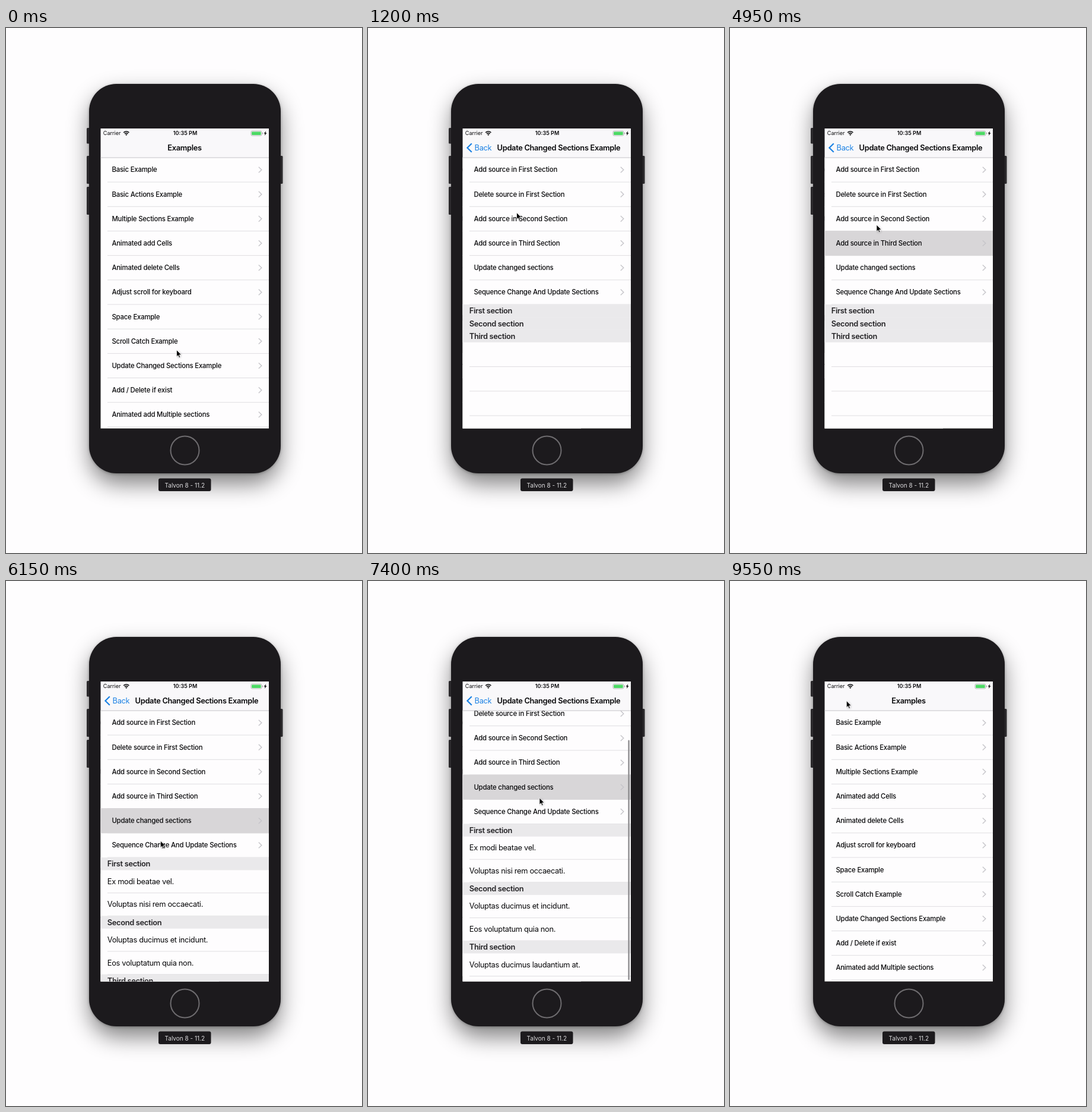
Recreate the animation shown at these times as an HTML page. Size 600 by 883 pixels, loop 9.75 s.

```html
<!DOCTYPE html>
<html lang="en">
<head>
<meta charset="utf-8">
<title>Section updates</title>
<style>
  html, body { margin: 0; width: 100%; height: 100%; overflow: hidden; background: #fefdfe; }
  svg { display: block; width: 600px; height: 883px; }
  text { font-family: Inter, Roboto, sans-serif; fill: #08080a; white-space: pre; }
  .row { font-size: 11.33px; font-weight: 500; letter-spacing: -.016em; }
  .title, .head { font-size: 12.84px; font-weight: 600; letter-spacing: -.025em; }
  .title { text-anchor: middle; }
  .head { fill: #242326; }
  .item, .back { font-size: 12.84px; letter-spacing: -.025em; }
  .back { fill: #1c82e4; }
  .status { font-size: 9.07px; }
  .line { fill: #dcdbde; }
  .chev { fill: none; stroke: #c6c5ca; stroke-width: 1.4; }
</style>
</head>
<body>
<svg viewBox="0 0 600 883" xmlns="http://www.w3.org/2000/svg">
  <defs>
    <clipPath id="screen"><rect x="159.5" y="169" width="283.5" height="504.5"/></clipPath>
    <filter id="blur" x="-40%" y="-30%" width="180%" height="160%"><feGaussianBlur stdDeviation="19"/></filter>
    <filter id="soft" x="-10%" y="-10%" width="120%" height="120%"><feGaussianBlur stdDeviation="2"/></filter>
  </defs>

  <rect x="142" y="112" width="319" height="654" rx="46" opacity=".5" filter="url(#blur)"/>
  <rect x="140" y="95" width="323" height="655" rx="46" opacity=".28" filter="url(#soft)"/>
  <g fill="#2b292c">
    <rect x="136" y="168" width="8" height="26.5" rx="1.5"/>
    <rect x="136" y="215" width="8" height="47" rx="1.5"/>
    <rect x="136" y="267" width="8" height="47" rx="1.5"/>
    <rect x="458" y="215" width="8.5" height="47" rx="1.5"/>
  </g>
  <rect x="140" y="94" width="323" height="655" rx="46" fill="#1c1a1d"/>
  <circle cx="301.5" cy="710.5" r="24" fill="none" stroke="#6e6c6f" stroke-width="2"/>
  <rect x="257" y="757.5" width="88.5" height="21.5" rx="3" fill="#1c1a1d"/>
  <text x="301.3" y="772.6" text-anchor="middle" style="font-size:10px;fill:#dddcde">Talvon 8 - 11.2</text>

  <g clip-path="url(#screen)">
    <g id="menu"></g>
    <g id="detail"></g>
    <rect x="159" y="169" width="285" height="49" fill="#f9f8fa"/>
    <rect x="159" y="217.6" width="285" height=".9" fill="#bfbec2"/>
    <text class="title" id="menuTitle" x="301" y="205.8">Examples</text>
    <text class="title" id="detailTitle" x="321.4" y="205.8">Update Changed Sections Example</text>
    <path id="backArrow" d="M174.8 194.2L167.4 201.5L174.8 208.8" fill="none" stroke="#1c82e4" stroke-width="2.2"/>
    <text class="back" id="backText" x="179.6" y="205.8">Back</text>
    <text class="status" x="163.8" y="180.4">Carrier</text>
    <text class="status" x="302" y="180.4" text-anchor="middle" font-weight="600">10:35 PM</text>
    <path d="M198.2 175.9a6.5 6.5 0 0 1 9.2 0M200 178a4 4 0 0 1 5.6 0" fill="none" stroke="#08080a" stroke-width="1.6"/>
    <path d="M201.2 179.3a2.2 2.2 0 0 1 3.2 0l-1.6 1.7z"/>
    <rect x="412.9" y="173.3" width="18" height="7.8" rx="2" fill="#fff" stroke="#a3a3a5" stroke-width=".8"/>
    <rect x="414.1" y="174.5" width="15.6" height="5.4" rx="1" fill="#4cd964"/>
    <rect x="431.8" y="175.8" width="1.1" height="2.8" rx=".5" fill="#a3a3a5"/>
    <path d="M438.3 173.2l-3.7 4.4h2.1l-.9 3.4 3.7-4.5h-2.2z"/>
  </g>

  <g id="cursor">
    <path d="M.6 1V12.2L3.2 9.8L4.9 13.8L6.6 13L5 9.2H8.6Z" opacity=".3" filter="url(#soft)"/>
    <path d="M0 0V11.4L2.6 9L4.3 13L6.2 12.2L4.5 8.3H8.1Z" stroke="#fff" stroke-width=".8"/>
  </g>
</svg>

<script>
const LOOP = 9750, STEP = 50;
const LEFT = 159, WIDTH = 285, TOP = 217.9, VIEW = 455.6;
const ROW = 41.18, ITEM = 38.55, HEAD = 21.16;
const MAX_SCROLL = 47.6, CONTENT = VIEW + MAX_SCROLL;
const DRAG_START = 6650, DRAG_END = 7150, DRAG_Y = 540;

const $ = id => document.getElementById(id);
const clamp = v => Math.min(1, Math.max(0, v));
const span = (t, start, length) => clamp((t - start) / length);
const easeOut = u => 1 - (1 - u) ** 3;
const smooth = u => u * u * (3 - 2 * u);
const show = (node, value) => node.setAttribute('opacity', value);
const move = (node, x, y) => node.setAttribute('transform', `translate(${x} ${y})`);

function add(parent, tag, attrs, text) {
  const node = document.createElementNS('http://www.w3.org/2000/svg', tag);
  for (const key in attrs) node.setAttribute(key, attrs[key]);
  if (text) node.textContent = text;
  return parent.appendChild(node);
}

const box = (parent, y, height, fill) =>
  add(parent, 'rect', { x: LEFT, y, width: WIDTH, height, fill });
const line = (parent, y) =>
  add(parent, 'rect', { class: 'line', x: 171, y: y - .45, width: 273, height: .9 });

// Adds a list of tappable rows and returns their highlight boxes.
function addRows(parent, labels) {
  return labels.map((label, i) => {
    const y = TOP + i * ROW, mid = y + ROW / 2;
    line(parent, y + ROW);
    const mark = box(parent, y - .5, ROW + 1, '#d8d6d8');
    add(parent, 'text', { class: 'row', x: 178.4, y: mid + 4 }, label);
    add(parent, 'path', { class: 'chev', d: `M425.8 ${mid - 4.8}L430.8 ${mid}L425.8 ${mid + 4.8}` });
    return mark;
  });
}

const menu = $('menu'), detail = $('detail');
box(menu, TOP, 460, '#fefdfe');
const menuMarks = addRows(menu, [
  'Basic Example', 'Basic Actions Example', 'Multiple Sections Example',
  'Animated add Cells', 'Animated delete Cells', 'Adjust scroll for keyboard',
  'Space Example', 'Scroll Catch Example', 'Update Changed Sections Example',
  'Add / Delete if exist', 'Animated add Multiple sections'
]);
const shade = box(menu, TOP, 460, '#000');

box(detail, TOP, 460, '#fefdfe');
const list = add(detail, 'g');
const detailMarks = addRows(list, [
  'Add source in First Section', 'Delete source in First Section',
  'Add source in Second Section', 'Add source in Third Section',
  'Update changed sections', 'Sequence Change And Update Sections'
]);
const sections = [
  ['First section', 'Ex modi beatae vel.', 'Voluptas nisi rem occaecati.'],
  ['Second section', 'Voluptas ducimus et incidunt.', 'Eos voluptatum quia non.'],
  ['Third section', 'Voluptas ducimus laudantium at.']
].map(([name, ...labels]) => {
  const group = add(list, 'g'), items = add(group, 'g');
  box(items, HEAD, labels.length * ITEM, '#fefdfe');
  labels.forEach((label, i) => {
    const y = HEAD + i * ITEM;
    add(items, 'text', { class: 'item', x: 170.8, y: y + ITEM / 2 + 4.3 }, label);
    line(items, y + ITEM);
  });
  box(group, 0, HEAD + .2, '#eae9eb');
  add(group, 'text', { class: 'head', x: 170.8, y: HEAD / 2 + 4.8 }, name);
  return { group, items, height: labels.length * ITEM };
});
const blanks = [1, 2, 3, 4].map(() => line(list, 0));
const thumb = add(detail, 'rect', { x: 438.4, width: 2.4, rx: 1.2, fill: '#8b8a8d' });

// Time, x, y of the pointer tip.
const path = [
  [0, 287.5, 541.5], [150, 277, 562], [600, 277, 562], [750, 276, 540],
  [950, 266, 430], [1100, 255, 345], [1200, 250.5, 310.5], [1300, 249, 268],
  [1450, 248, 240], [2050, 248, 239], [2200, 247, 237], [2400, 247, 237],
  [2600, 252, 262], [2750, 248, 305], [2900, 243, 320.5], [3650, 243, 320.5],
  [3750, 242, 318], [3850, 242, 318], [4100, 246, 357], [4500, 246, 357],
  [4850, 246, 335], [4950, 247, 331], [5050, 247, 331], [5350, 246, 410],
  [6000, 246, 410], [6250, 270, 455], [6350, 270, 455], [6550, 300, 540],
  [6650, 300, 540], [6950, 291, 372], [7350, 291, 372], [7500, 285, 350],
  [7900, 240, 250], [8200, 200, 206], [8350, 195, 202], [8400, 195, 202],
  [8500, 193, 201], [8550, 196.3, 201.5], [LOOP, 196.3, 201.5]
];

function pointer(t) {
  const i = path.findIndex(p => p[0] > t);
  const [t0, x0, y0] = path[i - 1], [t1, x1, y1] = path[i];
  const u = (t - t0) / (t1 - t0);
  return [x0 + (x1 - x0) * u, y0 + (y1 - y0) * u];
}

// Finger drag with rubber band, then a spring back to the end of the list.
function scrollAt(t) {
  if (t < DRAG_START) return 0;
  const drag = DRAG_Y - pointer(Math.min(t, DRAG_END))[1];
  if (drag <= MAX_SCROLL) return drag;
  const over = VIEW * (1 - 1 / ((drag - MAX_SCROLL) * .55 / VIEW + 1));
  const age = Math.max(0, t - DRAG_END) / 75;
  return MAX_SCROLL + over * (1 + age) * Math.exp(-age);
}

// Row index, highlighted from, until.
const taps = [[0, 1600, 3250], [2, 3150, 4300], [3, 4200, 5600], [4, 5500, LOOP]];

function drawDetail(t) {
  detailMarks.forEach((mark, i) =>
    show(mark, +taps.some(([row, from, to]) => row === i && t >= from && t < to)));

  const grow = smooth(span(t, 5650, 350));
  let y = TOP + 6 * ROW;
  for (const { group, items, height } of sections) {
    move(group, 0, y);
    show(items, grow);
    y += HEAD + height * grow;
  }
  const pitch = ROW + (ITEM - ROW) * grow;
  blanks.forEach((blank, i) => blank.setAttribute('y', y + pitch * (i + 1) - .45));

  const scroll = scrollAt(t);
  move(list, 0, -scroll);
  const over = Math.max(0, scroll - MAX_SCROLL);
  const height = VIEW * VIEW / CONTENT - over;
  thumb.setAttribute('height', height);
  thumb.setAttribute('y', over ? 671 - height : 219 + scroll * VIEW / CONTENT);
  show(thumb, span(t, DRAG_START, 100) * (1 - span(t, 7700, 300)));
}

function draw(t) {
  const open = easeOut(span(t, 450, 550)) - easeOut(span(t, 8750, 600));
  const shut = 1 - open;

  move(menu, -85 * open, 0);
  show(shade, .1 * open);
  menuMarks.forEach((mark, i) =>
    show(mark, i === 8 && t >= 350 ? 1 - span(t, 8900, 600) : 0));

  move(detail, 284 * shut, 0);
  detail.style.display = open > 0 ? '' : 'none';
  drawDetail(t);

  move($('menuTitle'), -105 * open, 0);
  show($('menuTitle'), clamp(1 - open * 1.3));
  move($('detailTitle'), 150 * shut, 0);
  show($('detailTitle'), open);
  move($('backText'), 90 * shut, 0);
  show($('backText'), open);
  show($('backArrow'), open);

  move($('cursor'), ...pointer(t));
}

function tick() {
  const t = performance.now() % LOOP;
  draw(Math.floor(t / STEP) * STEP);
  requestAnimationFrame(tick);
}
tick();
</script>
</body>
</html>
```
